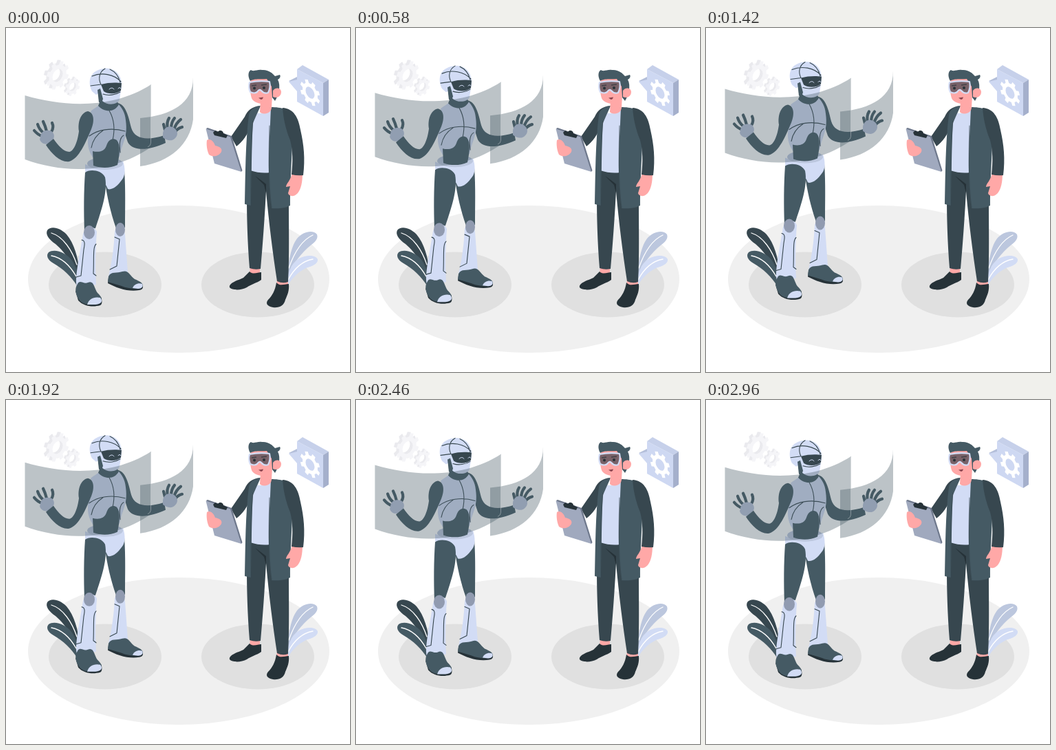
Animation of 500 by 500 pixels, one loop 3 s. Source, as an HTML page:

```html
<!DOCTYPE html>
<html lang="en">
<head>
<meta charset="utf-8">
<title>Robot and engineer</title>
<style>
html, body { margin: 0; width: 100%; height: 100%; overflow: hidden; background: #fff; }
svg { display: block; width: 100vw; height: 100vh; }
.slate { fill: #455a64; }
.dark { fill: #37474f; }
.black { fill: #263238; }
.pale { fill: #d2dcf5; }
.mid { fill: #919bb0; }
.palm { fill: #bcc4dc; }
.skin { fill: #ffa8a7; }
.line { fill: none; stroke: #37474f; stroke-width: 1.1; stroke-linecap: round; stroke-linejoin: round; }
.vein { fill: none; stroke: #fff; stroke-width: 1.3; stroke-linecap: round; }
.fingers { fill: none; stroke: #455a64; stroke-width: 4.2; stroke-linecap: round; stroke-linejoin: round; }
.screen { fill: #455a64; fill-opacity: .36; }
</style>
</head>
<body>
<svg viewBox="0 0 500 500">
  <!-- floor -->
  <ellipse cx="251" cy="365" rx="219" ry="107" fill="#f0f0f0"/>
  <ellipse cx="144" cy="373" rx="82" ry="47.5" fill="#e0e0e0"/>
  <ellipse cx="366" cy="373" rx="82" ry="47.5" fill="#e0e0e0"/>

  <!-- plants -->
  <path class="dark" d="M105 362C102 350 88 328 72 314C62 307 57 300 60 294C65 287 79 290 88 300C99 313 105 334 106 352Z"/>
  <path class="slate" d="M104 376C96 362 83 350 69 342C60 337 58 330 62 326C70 320 88 326 96 338C103 349 106 362 106 374Z"/>
  <path class="vein" d="M66 298C83 303 96 323 103 344M66 331C82 334 94 347 102 361"/>
  <path fill="#bcc7de" d="M409 362C411 345 412 321 423 306C432 295 447 293 452 300C455 308 446 313 438 320C424 333 414 349 409 362Z"/>
  <path class="pale" d="M408 377C408 358 414 342 426 335C437 329 450 330 453 336C454 343 445 346 436 349C424 355 415 364 408 377Z"/>
  <path class="vein" d="M446 301C428 309 418 329 411 349M446 336C429 339 418 351 410 366"/>

  <g id="gears"></g>

  <!-- speech block -->
  <path fill="#c6d0ea" d="M423 60L431 54L469 75L461 80Z"/>
  <path fill="#a5b0cc" d="M461 80L469 75V123L461 128Z"/>
  <path fill="#b4bfda" d="M411 77L423 71V83Z"/>
  <path fill="#ced8f2" d="M423 60L461 80V128L423 107V92L411 78L423 75Z"/>
  <g id="badge"></g>

  <g id="robot">
    <!-- far leg -->
    <path class="slate" d="M144 224L172 207C174 236 173 264 173 290L160 291C152 268 147 246 144 224Z"/>
    <path class="pale" d="M158 295C164 287 172 291 173 300L177 355L169 365L149 361C154 339 157 319 158 295Z"/>
    <path class="line" d="M158 304L165 307L161 346L151 351"/>
    <ellipse class="mid" cx="166" cy="293" rx="7" ry="10"/>
    <path class="black" d="M149 363L148 371C161 378 178 384 194 381C199 380 200 377 198 373Z"/>
    <path class="slate" d="M149 361C153 353 161 357 169 354C178 351 180 360 187 365C194 368 199 370 199 375C196 380 180 380 168 375L148 369Z"/>
    <path class="pale" d="M184 378C186 372 193 370 198 372C200 376 197 379 192 379Z"/>

    <!-- near leg -->
    <path class="pale" d="M115 198C132 207 160 204 170 193C174 205 173 215 169 220C162 230 154 236 148 234C143 222 132 212 115 209Z"/>
    <path class="slate" d="M115 210C121 205 139 206 144 217C148 238 139 264 130 291L114 296C113 267 113 237 115 210Z"/>
    <path class="pale" d="M112 299C117 288 128 286 132 296C130 322 130 349 131 373L104 378C98 369 107 331 112 299Z"/>
    <path class="line" d="M110 308C116 309 114 316 113 322L109 360L102 362M131 314C126 318 128 333 127 357L131 360"/>
    <ellipse class="mid" cx="121" cy="297" rx="8" ry="10"/>
    <path class="black" d="M101 382L105 396C113 405 127 406 137 403C140 401 140 397 138 391Z"/>
    <path class="slate" d="M104 372C107 365 113 373 119 370C128 366 128 378 133 385C138 390 141 394 138 399C130 404 114 403 108 397C101 389 99 379 104 372Z"/>
    <path class="pale" d="M118 402C120 394 128 390 137 392C141 397 139 401 130 402Z"/>

    <!-- arms -->
    <path class="slate" d="M162 109C174 111 178 128 182 145C187 162 206 164 230 156L232 167C208 178 185 180 177 166C171 150 169 130 162 119Z"/>
    <path class="fingers" d="M231 148L229 140M235 147Q233 137 237 131M240 146Q240 137 245 131M244 148Q247 138 254 133M246 151Q249 146 256 144"/>
    <path class="palm" d="M228 154C228 146 236 140 244 145C250 149 251 156 245 161C240 166 231 162 228 159Z"/>
    <path class="fingers" d="M52 157Q46 155 41 149M54 152Q48 147 46 140M59 150Q57 142 54 136M66 151Q70 144 67 138"/>
    <path class="palm" d="M50 158C51 150 58 147 66 150C71 153 71 160 67 164C62 171 52 170 49 162Z"/>

    <!-- body -->
    <ellipse cx="144" cy="197" rx="26" ry="9" fill="#bcc7de"/>
    <path class="pale" d="M123 121C129 116 134 114 137 110L163 110C168 116 173 122 174 134C176 148 174 156 172 163C168 175 166 180 165 187L126 188C117 175 118 160 121 150C125 138 125 127 123 121Z"/>
    <path class="line" d="M121 157C133 148 153 144 173 150M150 120C158 134 158 150 155 163M124 174C126 163 133 154 141 149M171 156C164 160 165 172 166 181"/>
    <path class="slate" d="M127 200L126 179C134 181 143 180 146 171C149 162 155 159 161 163C167 170 165 185 162 199C151 204 138 204 127 200Z"/>
    <path class="slate" d="M119 121C108 123 104 138 106 150C104 165 99 179 92 180C84 180 76 171 69 161L58 170C67 184 80 196 92 194C106 190 116 166 124 147C129 135 128 123 119 121Z"/>
    <path class="slate" d="M132 88L137 106L134 113C143 123 158 123 164 111L160 104Z"/>

    <!-- head -->
    <path class="pale" d="M125 92C118 78 121 60 146 58.500C160 59 169 70 168 84L165 104C162 112 147 113 140 106L136 94L131 97Z"/>
    <path class="slate" d="M133 90L137 88L141 103L139 109L135 108Z"/>
    <path class="dark" d="M138 82C148 79 160 79 168 80L167 91C161 96 149 97 142 92Z"/>
    <path class="line" d="M125 70C139 64 157 67 167 78M144 59C135 64 134 74 138 82M151 60C160 64 164 71 166 79M123 84L138 82M141 96C149 99 160 97 166 93"/>
    <path d="M150 89Q154 85 157 89M163 88Q165 85 167 88" fill="none" stroke="#d2dcf5" stroke-linecap="round"/>

    <!-- panels -->
    <path class="screen" d="M27.500 98C85 115 155 118 211 82V173C155 212 85 212 27.500 191Z"/>
    <path class="screen" d="M195 131C240 127 272 110 272 72V133C267 169 239 195 195 201Z"/>
    <path d="M210.500 83V167Q210.500 171 206 173" fill="none" stroke="#fff" stroke-opacity=".35"/>
  </g>

  <!-- engineer: far arm and clipboard -->
  <path class="dark" d="M370 113C357 114 351 120 347 129L327 158L335 172C344 165 351 155 356 143Z"/>
  <path fill="#6e788c" d="M291 146L293 145L328 157L343.500 207L342 209Z"/>
  <path fill="#a0a9be" d="M290.500 146.500L326 158.500L342 209L303 197Z"/>
  <path class="black" d="M301 152L304 149L308 151C311 147 316 150 316 153L322 156L320 160L303 156Z"/>
  <path class="skin" d="M292 163C297 160 302 165 304 171C310 172 315 175 313 180C309 187 300 188 295 184C292 178 291 169 292 163Z"/>

  <!-- legs -->
  <path class="skin" d="M355 347H369V358H354ZM394 364H410V376H393Z"/>
  <path class="black" d="M354 354C359 359 366 355 371 355V366C364 371 357 372 350 377C341 382 328 381 325 377C324 370 337 367 345 363Z"/>
  <path class="black" d="M393 370C398 376 405 372 411 372C412 382 409 388 406 395C404 404 397 407 388 406C379 404 377 400 381 395C387 389 391 382 393 370Z"/>
  <path class="dark" d="M356 205H384L411 255C411 291 412 331 410 369Q402 372 394 368C388 329 382 282 378 237C376 275 373 317 370 350Q362 352 354 349C351 311 350 275 350 244Z"/>
  <path class="black" d="M362 215Q372 222 378 227L378 240L375 228Z"/>

  <!-- coat and shirt -->
  <path class="pale" d="M358 122Q376 128 388 117L384 210Q370 212 355 207Z"/>
  <path class="slate" d="M370 113C361 115 355 118 353 126C348 165 348 213 347 256L356 258C357 211 357 166 359 138Z"/>
  <path class="slate" d="M385 115C400 115 413 118 416 128C418 162 413 210 413 258C406 262 395 263 386 262C380 225 382 170 384 140Z"/>
  <path class="line" stroke-opacity=".6" d="M359 135C355 165 356 225 356 258M383 142C382 180 381 224 386 261"/>

  <!-- near arm -->
  <path class="skin" d="M416 210H431C431 224 429 234 424 240C419 246 411 245 410 240L413 230L407 231C407 226 414 222 416 210Z"/>
  <path class="dark" d="M402 116C418 117 425 130 428 148C433 170 435 190 432 214Q424 215 415 213C417 195 417 178 413 163C406 146 403 130 402 116Z"/>

  <!-- head -->
  <path class="skin" d="M370 104L387 98L386 116C385 126 371 126 369 122Z"/>
  <path class="skin" d="M356 73C365 68 383 68 390 78C392 92 386 103 379 108C372 112 360 109 357 102C354 93 355 82 356 73Z"/>
  <path class="slate" d="M355 77C351 70 352 63 356 61C360 64 365 60 372 61C381 60 388 66 391 70L398 68C400 71 397 74 395 75C400 84 396 98 391 106L387 101L386 85C383 80 381 77 379 74C370 75 361 73 355 77Z"/>
  <path class="skin" d="M388 91C392 85 400 87 400 93C400 99 394 103 388 100Z"/>
  <path fill="#786168" stroke="#d2dcf5" stroke-width="2.200" stroke-linejoin="round" d="M354 79Q368 76 383 78Q385 86 381 94Q375 96 371 91Q368 88 365 93Q361 96 355 93Q352 86 354 79Z"/>
  <path stroke="#263238" stroke-width="1.500" opacity=".65" d="M357 84L364 83M371 83L379 82"/>
  <circle class="black" cx="361" cy="87.500" r="2"/>
  <circle class="black" cx="375" cy="87" r="2"/>
  <path fill="#8f4650" d="M367 101.500L374 100.500Q373 104 370.500 104Z"/>
</svg>
<script>
const $ = id => document.getElementById(id);

// Ring with evenly spaced teeth, in units of its outer radius.
function gearPath(teeth, hole) {
  const point = (r, a) => `${r * Math.cos(a)} ${r * Math.sin(a)}`;
  const step = 2 * Math.PI / teeth;
  let d = "";
  for (let i = 0; i < teeth; i++) {
    [[.76, .2], [1, .3], [1, .7], [.76, .8]].forEach(([r, k], j) => {
      d += (i || j ? "L" : "M") + point(r, (i + k) * step);
    });
  }
  return `${d}ZM${hole} 0A${hole} ${hole} 0 1 0 ${-hole} 0A${hole} ${hole} 0 1 0 ${hole} 0Z`;
}

function gear(x, y, r, slope, fill) {
  return `<path fill="${fill}" fill-rule="evenodd" d="${gearPath(8, .45)}"
    transform="matrix(${.83 * r} ${slope * r} 0 ${r} ${x} ${y})"/>`;
}

$("gears").innerHTML =
  gear(71, 67, 20, -.3, "#eaeaee") + gear(75, 69, 20, -.3, "#f5f5f8") +
  gear(94.5, 84, 13, -.3, "#eaeaee") + gear(97, 85.5, 13, -.3, "#f5f5f8");
$("badge").innerHTML = gear(442, 94, 17.5, .46, "#fff");

const LOOP = 3000, RISE = 10;

function draw() {
  const p = performance.now() % LOOP / LOOP;
  const lift = RISE * (1 - Math.abs(1 - 2 * p));
  $("robot").setAttribute("transform", `translate(0 ${-lift})`);
  requestAnimationFrame(draw);
}
draw();
</script>
</body>
</html>
```
